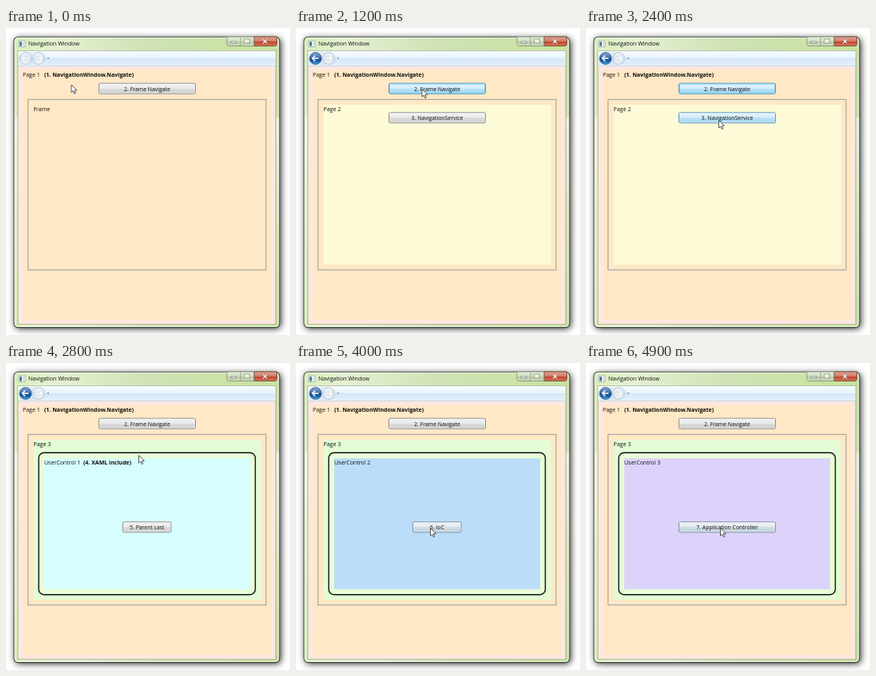
Animation, 356 px wide and 384 px high, one loop 5000 ms. Source, as an HTML page with a canvas:

```html
<!DOCTYPE html>
<html lang="en">
<head>
<meta charset="utf-8">
<title>Navigation Window</title>
<style>
  html, body { margin: 0; width: 100%; height: 100%; overflow: hidden; background: #fff; }
  canvas { display: block; width: 356px; height: 384px; }
</style>
</head>
<body>
<canvas id="stage"></canvas>
<script>
const W = 356, H = 384, LOOP = 5000, STEP = 100;
const canvas = document.getElementById('stage');
const dpr = window.devicePixelRatio || 1;
canvas.width = W * dpr;
canvas.height = H * dpr;
const ctx = canvas.getContext('2d');
ctx.scale(dpr, dpr);

// Moments when the view changes
const PAGE2 = 1100, PAGE3 = 2700, CONTROL2 = 3900, CONTROL3 = 4800;
const INACTIVE = [600, 1000];

// Pointer moves: start, end, from, to
const MOVES = [
  [200, 600, [82, 71], [158, 76.5]],
  [1700, 2300, [158.5, 77], [166.5, 115.5]],
  [2800, 3300, [166.5, 115.5], [167.5, 206.5]],
  [3500, 3800, [167.5, 206.5], [168.5, 206.5]]
];

const NORMAL = [[242, 242, 242], [233, 233, 233], [220, 220, 220], [207, 207, 207]];
const HOVER = [[228, 243, 251], [212, 237, 250], [186, 226, 248], [165, 214, 241]];

const clamp = v => Math.max(0, Math.min(1, v));
const ease = v => v * v * (3 - 2 * v);
const ramp = (t, start, length = 300) => clamp((t - start) / length);
const mix = (a, b, k) => `rgb(${a.map((v, i) => Math.round(v + (b[i] - v) * k))})`;

function box(x, y, w, h, fill) {
  ctx.fillStyle = fill;
  ctx.fillRect(x, y, w, h);
}

function round(x, y, w, h, r, fill, stroke, width = 1) {
  ctx.beginPath();
  ctx.roundRect(x, y, w, h, r);
  if (fill) { ctx.fillStyle = fill; ctx.fill(); }
  if (stroke) { ctx.strokeStyle = stroke; ctx.lineWidth = width; ctx.stroke(); }
}

function grad(x0, y0, x1, y1, ...stops) {
  const g = ctx.createLinearGradient(x0, y0, x1, y1);
  stops.forEach(([at, color]) => g.addColorStop(at, color));
  return g;
}

function text(str, x, y, { bold = false, align = 'left', size = 7 } = {}) {
  ctx.font = `${bold ? 'bold ' : ''}${size}px "Open Sans", "Noto Sans", sans-serif`;
  ctx.textAlign = align;
  ctx.fillStyle = '#111';
  ctx.fillText(str, x, y);
}

function path(points, fill, stroke, width = 1, close = true) {
  ctx.beginPath();
  points.forEach(([x, y]) => ctx.lineTo(x, y));
  if (close) ctx.closePath();
  if (fill) { ctx.fillStyle = fill; ctx.fill(); }
  if (stroke) { ctx.strokeStyle = stroke; ctx.lineWidth = width; ctx.stroke(); }
}

function button(label, x, y, w, hover = 0, focused = false) {
  const h = 13;
  const c = NORMAL.map((n, i) => mix(n, HOVER[i], hover));
  const face = grad(0, y, 0, y + h, [0, c[0]], [0.5, c[1]], [0.5, c[2]], [1, c[3]]);
  const edge = focused ? '#4794bd' : mix([142, 142, 142], [92, 150, 186], hover);
  round(x, y, w, h, 1.8, face, edge);
  round(x + 1, y + 1, w - 2, h - 2, 1, null, focused ? '#7bd6f3' : 'rgba(255,255,255,.45)', 0.8);
  text(label, x + w / 2, y + 9.4, { align: 'center', size: 6.9 });
}

function captionButtons(active) {
  const edge = active ? '#8a957e' : '#a0a5a8';
  const face = active
    ? grad(0, 11, 0, 23, [0, '#e6eedb'], [0.48, '#d2dfc1'], [0.5, '#bccba8'], [1, '#d3e2be'])
    : '#f5f7f8';
  round(277, 11, 62.5, 11.5, [0, 0, 3, 3], face, edge, 0.9);
  if (active) {
    const red = grad(0, 11, 0, 23, [0, '#e0a596'], [0.48, '#d17860'], [0.5, '#be4029'], [1, '#d98160']);
    round(311.2, 11, 28.3, 11.5, [0, 0, 3, 0], red, '#81493d', 0.9);
  }
  box(293.6, 11.5, 0.8, 11, edge);
  box(310.4, 11.5, 0.8, 11, edge);
  const ink = active ? '#fff' : '#777';
  ctx.strokeStyle = '#6b716b';
  ctx.lineWidth = 0.7;
  ctx.fillStyle = ink;
  ctx.fillRect(282, 17, 7, 2);
  ctx.strokeRect(282, 17, 7, 2);
  ctx.strokeRect(298.8, 14, 6.4, 5);
  ctx.strokeStyle = ink;
  ctx.strokeRect(299.6, 14.9, 4.8, 3.2);
  ctx.strokeRect(301, 15.9, 2, 1.2);
  for (const [color, width] of [[active ? '#8b5046' : '#666', 2.3], ['#fff', 1.3]]) {
    path([[322.3, 14.3], [327, 19.1]], null, color, width, false);
    path([[327, 14.3], [322.3, 19.1]], null, color, width, false);
  }
}

function orb(x, y, r, dir, enabled) {
  const fill = enabled
    ? grad(0, y - r, 0, y + r, [0, '#86aed6'], [0.46, '#386fac'], [0.5, '#0e438c'], [0.75, '#1765b0'], [1, '#4fb6e6'])
    : grad(0, y - r, 0, y + r, [0, '#f5f8fc'], [0.5, '#dce6f1'], [1, '#f1f6fb']);
  ctx.beginPath();
  ctx.arc(x, y, r, 0, Math.PI * 2);
  ctx.fillStyle = fill;
  ctx.fill();
  ctx.strokeStyle = enabled ? '#34567f' : '#b1bfce';
  ctx.lineWidth = 0.9;
  ctx.stroke();
  const tip = x + dir * 4, mid = x + dir * 0.5;
  const lines = [[[x - dir * 3.8, y], [tip, y]], [[mid, y - 3.4], [tip, y], [mid, y + 3.4]]];
  if (!enabled) lines.forEach(l => path(l, null, '#bccad9', 2.6, false));
  lines.forEach(l => path(l, null, '#fff', 1.6, false));
}

function chrome(t, active) {
  ctx.save();
  ctx.shadowColor = active ? 'rgba(0,0,0,.85)' : 'rgba(0,0,0,.5)';
  ctx.shadowBlur = (active ? 9 : 6) * dpr;
  ctx.shadowOffsetX = 1.5 * dpr;
  ctx.shadowOffsetY = 1.5 * dpr;
  round(10, 11.5, 333, 363, 5, '#ddd');
  ctx.restore();

  const glass = active
    ? grad(10, 0, 342, 0, [0, '#d9efb9'], [0.15, '#e5f1d2'], [0.5, '#d0e2b6'], [1, '#c6e39c'])
    : '#fbfcfc';
  round(10, 11.2, 332.8, 363.4, 5, glass, active ? '#3f463a' : '#777b7d', 1.1);
  round(11.1, 12.3, 330.6, 361.2, 4, null, 'rgba(255,255,255,.75)', 0.9);
  if (active) {
    const side = grad(0, 28, 0, 372, [0, 'rgba(255,255,255,0)'], [0.24, 'rgba(255,255,255,.1)'],
      [0.25, 'rgba(255,255,255,.6)'], [0.6, 'rgba(255,255,255,.25)'], [1, 'rgba(255,255,255,0)']);
    box(11, 28, 4, 344, side);
    box(338.3, 28, 4, 344, side);
  }

  // Window icon
  box(16, 16, 8, 7.5, '#fff');
  ctx.strokeStyle = '#9aa5ac';
  ctx.lineWidth = 0.8;
  ctx.strokeRect(16, 16, 8, 7.5);
  box(17, 17.2, 3, 5.3, '#4a7f9e');
  box(21, 17.5, 2, 4.5, '#d3dce2');
  text('Navigation Window', 28, 22.3, { size: 7.1 });
  captionButtons(active);

  // Client area and navigation bar
  box(14.5, 28, 324, 343, active ? '#98a48c' : '#a9adb0');
  box(15.3, 28.8, 322.4, 341.5, '#ffe7df');
  const bar = active
    ? grad(0, 29, 0, 48, [0, '#f8fcff'], [0.45, '#e7f2fc'], [0.5, '#d5e6f6'], [1, '#e4f2fd'])
    : grad(0, 29, 0, 48, [0, '#ffffff'], [0.48, '#f4f8fc'], [0.5, '#e3ebf4'], [1, '#edf4fb']);
  box(15.3, 28.8, 322.4, 18.7, bar);
  box(15.3, 47, 322.4, 0.8, '#c5d2df');
  round(16.2, 30, 33.2, 16, 8, 'rgba(205,220,235,.45)');
  orb(41, 38, 7.3, 1, false);
  orb(24.5, 38, 7.4, -1, t >= PAGE2);
  path([[51.2, 37.3], [54.4, 37.3], [52.8, 39]], '#66788a');
}

function frameContent(t) {
  if (t < PAGE2) {
    text('Frame', 34.5, 103.5);
    return;
  }
  if (t < PAGE3) {
    box(34.5, 96, 285, 200, '#fdfbd7');
    text('Page 2', 34.5, 103.5);
    button('3. NavigationService', 116.5, 105.8, 121, ramp(t, 2050));
    return;
  }
  box(34.5, 96, 285, 200, '#e3fcd5');
  text('Page 3', 34.5, 103.5);
  round(41, 112.3, 271.5, 177.4, 6.5, '#e8fcd6', '#111', 1.4);
  const index = t < CONTROL2 ? 0 : t < CONTROL3 ? 1 : 2;
  box(48, 119.3, 258, 163.5, ['#d6fefe', '#bbddf9', '#dcd2fc'][index]);
  text(`UserControl ${index + 1}`, 48, 126.8);
  const hover = ramp(t, [3300, CONTROL2, CONTROL3][index]);
  if (index === 0) text('(4. XAML include)', 97, 126.8, { bold: true });
  if (index < 2) button(['5. Parent cast', '6. IoC'][index], 146.5, 198.8, 60.5, hover);
  else button('7. Application Controller', 116.5, 198.8, 121, hover);
}

function pointer(t) {
  let [x, y] = MOVES[0][2];
  for (const [start, end, a, b] of MOVES) {
    if (t < start) break;
    const k = ease(clamp((t - start) / (end - start)));
    x = a[0] + (b[0] - a[0]) * k;
    y = a[1] + (b[1] - a[1]) * k;
  }
  const shape = [[0, 0], [0, 9.6], [2.2, 7.6], [3.8, 11.1], [5.3, 10.4], [3.8, 7], [6.8, 6.8]];
  path(shape.map(([px, py]) => [x + px, y + py]), '#fff', '#30302f', 0.8);
}

function draw(t) {
  const active = t < INACTIVE[0] || t >= INACTIVE[1];
  ctx.clearRect(0, 0, W, H);
  box(0, 0, W, H, '#fff');
  chrome(t, active);

  box(21, 53, 312, 312, '#ffe8c5');
  text('Page 1', 21, 61.3);
  text('(1. NavigationWindow.Navigate)', 48, 61.3, { bold: true });
  const hover = ramp(t, 350) * (1 - ramp(t, 2500));
  button('2. Frame Navigate', 116.5, 69.2, 121, hover, t >= 800 && t < PAGE3);

  ctx.strokeStyle = '#a6a8a8';
  ctx.lineWidth = 1.2;
  ctx.strokeRect(27.6, 89.4, 298.4, 213.2);
  frameContent(t);
  pointer(t);
}

function tick(now) {
  const t = Math.floor((now % LOOP) / STEP) * STEP;
  draw(t < 200 ? 0 : t);
  requestAnimationFrame(tick);
}

draw(0);
requestAnimationFrame(tick);
</script>
</body>
</html>
```
